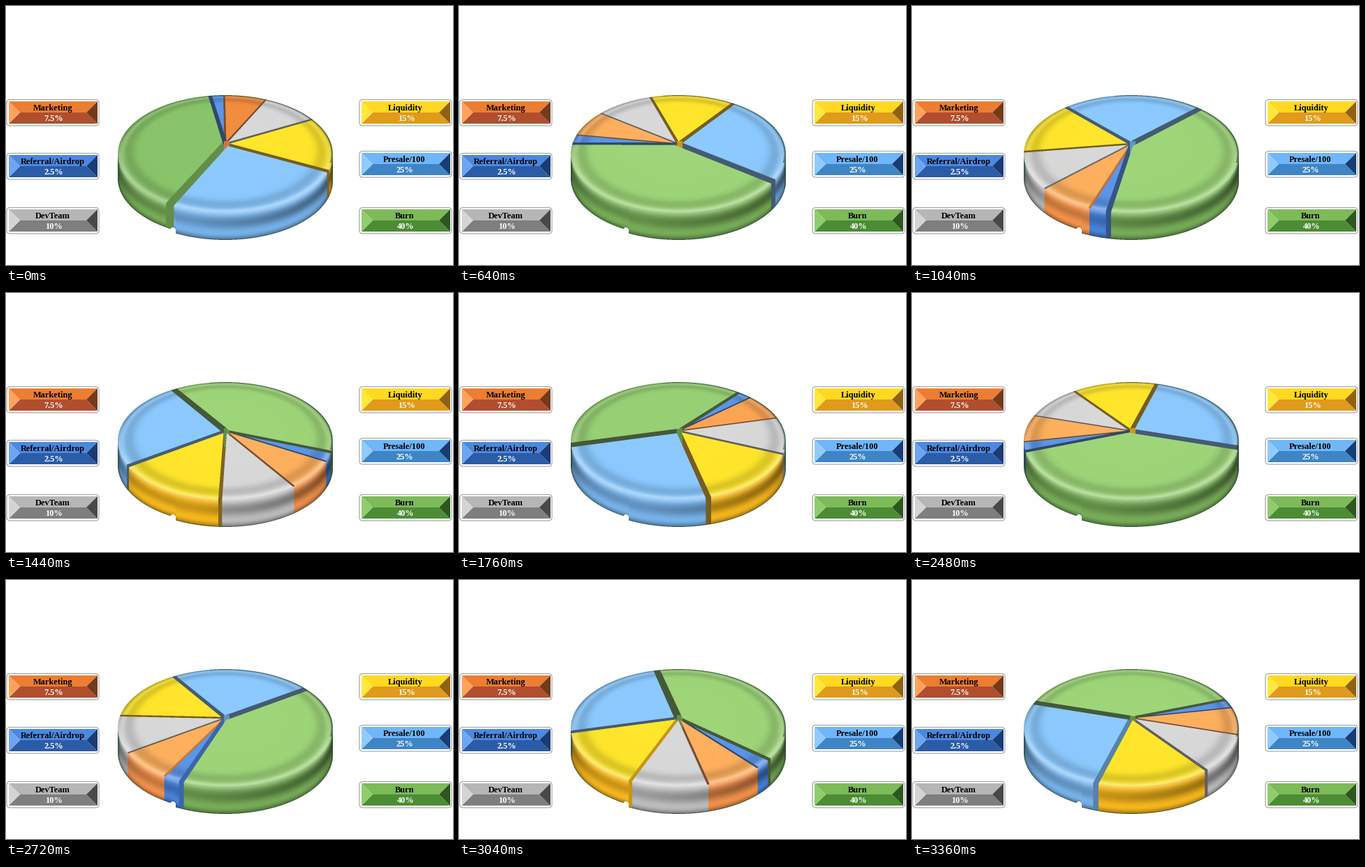
Recreate the animation shown at these times as a matplotlib script. Size 640 by 372 pixels, loop 3440 ms.

```python
import numpy as np
import matplotlib.pyplot as plt
from matplotlib.animation import FuncAnimation
from matplotlib.patches import FancyBboxPatch, Polygon

W, H, DPI = 640, 372, 100
FRAMES, INTERVAL = 43, 80

# Perspective of the disc: pivot, scales and foreshortening
PX, PY, AX, AY, K = 314, 198, 151.7, 82, 0.1716
EX, EY, RX, RY, DEPTH = 314, 212.5, 154, 84.5, 39
X0, X1, Y0, Y1, SS = 150, 480, 120, 345, 3

# Clockwise: marketing, dev team, liquidity, presale, burn, referral
SPANS = np.array([27, 36, 54, 90, 144, 9])
STARTS = np.cumsum(SPANS) - SPANS
TOP = np.array([(255, 176, 94), (216, 216, 216), (255, 230, 44),
                (139, 201, 255), (158, 213, 121), (92, 150, 232)], float)
DEEP = TOP.copy()
DEEP[0], DEEP[4] = (242, 140, 62), (138, 196, 106)
WALL = np.array([(236, 142, 74), (184, 184, 184), (240, 178, 28),
                 (116, 174, 228), (116, 168, 86), (70, 126, 212)], float)
GAPS = [0.02, 0.02, 0.03, 0.045, 0.074, 0.042]


def unproject(x, y):
    dx, dy = x - PX, y - PY
    v = dy / (AY + K * dy)
    u = dx * (1 - K * v) / AX
    return np.hypot(u, v), np.degrees(np.arctan2(u, -v)), v


def bump(x, mid, width):
    return np.exp(-((x - mid) / width) ** 2)


xs = X0 + (np.arange((X1 - X0) * SS) + 0.5) / SS
ys = Y0 + (np.arange((Y1 - Y0) * SS) + 0.5) / SS
gx, gy = np.meshgrid(xs, ys)
nx = (gx - EX) / RX
rim = EY + RY * np.sqrt(np.clip(1 - nx ** 2, 0, 1))
# The lower left edge is chipped, ending in a small notch
drop = np.where(gx < 243, DEPTH - 4, DEPTH)
on_top = nx ** 2 + ((gy - EY) / RY) ** 2 <= 1
on_wall = ~on_top & (np.abs(nx) <= 1) & (gy > EY) & (gy <= rim + drop)
body = (on_top | on_wall) & (np.hypot(gx - 239, gy - 322) > 4)
rad, ang, v_top = unproject(gx, np.where(on_wall, rim, gy))
depth = np.clip((gy - rim) / drop, 0, 1)

# Soft bevel on the face, rolled light on the wall, darker to the right
front = np.clip(v_top * 1.5 + 0.3, 0, 1)
dark_top = 1 - 0.14 * bump(rad, 0.9, 0.06) - 0.28 * (1 - front) * bump(rad, 1, 0.03)
dip = 0.22 + 0.2 * np.clip(nx + 0.3, 0, 1)
dark_wall = 1.06 - dip * bump(depth, 0.38, 0.24) - 0.35 * bump(depth, 1, 0.14)
dark_wall = dark_wall * (1 - 0.35 * np.abs(nx) ** 10)
shade = np.where(on_top, dark_top, dark_wall)[..., None]
glow = np.where(on_top, 0.3 * front * bump(rad, 0.98, 0.025)
                + 0.14 * (1 - front) * bump(rad, 0.95, 0.02),
                0.3 * bump(depth, 0, 0.12))[..., None]
edge = (on_top & (rad > 0.985) & (gx > 292) & (gy < 225)) | (
    on_wall & ((depth > 0.97) | (np.abs(nx) > 0.985)))


def gap_colour(j, phi):
    right = np.sin(np.radians(phi)) > 0
    wall = WALL[j - 1 if right else j]
    lit = 0 if right else bump(phi % 360, 206, 16)
    return wall * (0.4 + 0.45 * lit) + 22 * (1 - lit)


def render(turn):
    mix = np.clip(2 * np.cos(np.radians(turn)) - 1, 0, 1)
    face = TOP + (DEEP - TOP) * mix
    rel = (ang - turn) % 360
    part = np.clip(np.searchsorted(STARTS, rel, side="right") - 1, 0, 5)
    rgb = np.where(on_top[..., None], face[part], WALL[part]) * shade
    rgb += (255 - rgb) * glow
    in_gap = np.zeros(rad.shape, bool)
    for j, start in enumerate(STARTS):
        phi = turn + start
        delta = np.radians(ang - phi)
        seam = (np.abs(rad * np.sin(delta)) < GAPS[j] / 2) & (np.cos(delta) > 0)
        if GAPS[j] < 0.025:
            seam &= on_top
        rgb[seam] = gap_colour(j, phi)
        in_gap |= seam
    # Tip of the rearmost slice seen through the gaps
    back = np.searchsorted(STARTS, -turn % 360, side="right") - 1
    tip = in_gap & (np.abs(gx - 316) < 4) & (gy > 194) & (gy < 221)
    rgb[tip] = WALL[back] * 0.85
    rgb[edge] = rgb[edge] * 0.4 + np.array([22, 44, 30])
    rgb[~body] = 255
    rgb = np.clip(rgb, 0, 255)
    h, w = Y1 - Y0, X1 - X0
    return rgb.reshape(h, SS, w, SS, 3).mean(axis=(1, 3)) / 255


def turn_at(n):
    steps = np.interp(n, [0, 8, 13, 18, 27, 34, 42], [0, 8, 16, 24, 40, 51, 64])
    return -10 * np.round(steps) - 0.7


fig = plt.figure(figsize=(W / DPI, H / DPI), dpi=DPI, facecolor="white")
ax = fig.add_axes([0, 0, 1, 1])
ax.axis("off")
pie = ax.imshow(render(turn_at(0)), extent=(X0, X1, Y1, Y0),
                interpolation="nearest", aspect="auto")
ax.set_xlim(0, W)
ax.set_ylim(H, 0)


def label(x, y, text, colour):
    ax.text(x, y, text, color=colour, ha="center", va="baseline",
            family="Liberation Serif", weight="bold", size=12.4 * 72 / DPI)


def button(x, y, name, share, top, bottom, left, right, shift=0):
    ax.add_patch(FancyBboxPatch((x + 4, y + 4.5), 124, 29.5,
                                boxstyle="round,pad=4,rounding_size=5",
                                fc="white", ec="#a9a9a9", lw=0.9))
    l, r, t, b = x + 3, x + 130, y + 3, y + 35
    m, a, z = y + 19, x + 19, x + 114
    for points, colour in (
            ([(l, t), (r, t), (z, m), (a, m)], top),
            ([(l, b), (r, b), (z, m), (a, m)], bottom),
            ([(l, t), (a, m), (l, b)], left),
            ([(r, t), (z, m), (r, b)], right)):
        ax.add_patch(Polygon(points, fc=colour, ec="none"))
    label(x + 66 + shift, y + 16, name, "black")
    label(x + 67 + shift, y + 31, share, "white")


button(1, 134, "Marketing", "7.5%", "#ed7d31", "#b04e2e", "#ffa35c", "#743a1a")
button(1, 211, "Referral/Airdrop", "2.5%", "#4b88e0", "#2b5ca8", "#6ea5f2", "#1b3b74")
button(1, 289, "DevTeam", "10%", "#b6b6b6", "#7e7e7e", "#d4d4d4", "#484848")
button(506, 134, "Liquidity", "15%", "#ffd820", "#e09a1c", "#ffe83c", "#8e6212")
button(506, 208, "Presale/100", "25%", "#70b6fa", "#3f85c6", "#90caff", "#183c74", -2)
button(506, 289, "Burn", "40%", "#7dba58", "#4c8c34", "#90cc6c", "#2e561e", -1)


def update(n):
    pie.set_data(render(turn_at(n)))
    return (pie,)


anim = FuncAnimation(fig, update, frames=FRAMES, interval=INTERVAL,
                     repeat=True, repeat_delay=0, blit=False)
plt.show()
```
